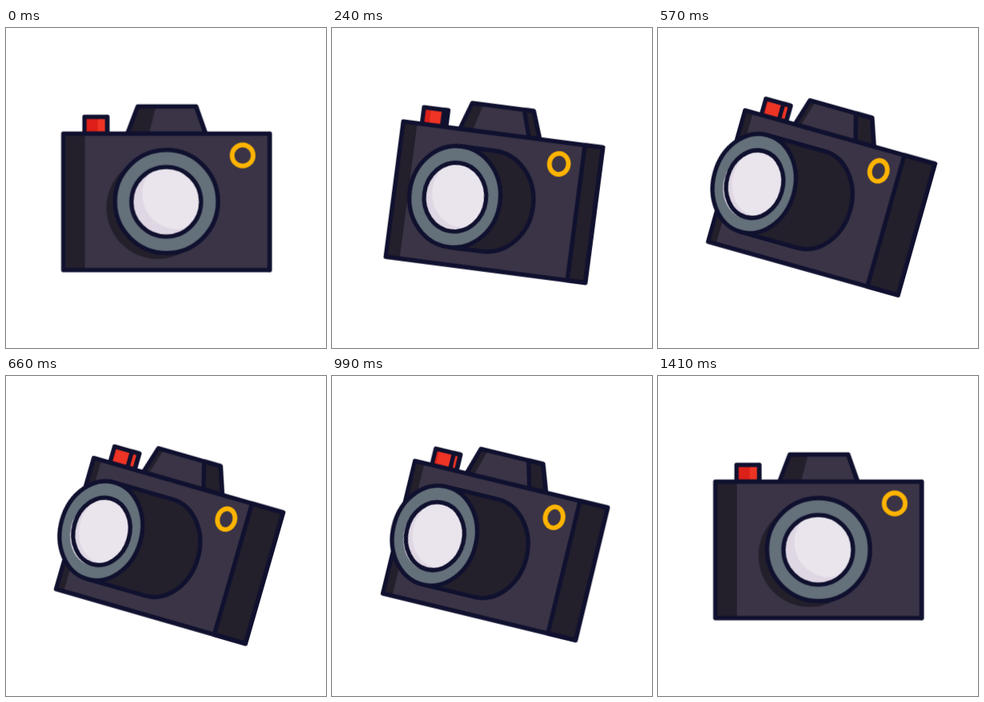
These frames come from a looping animation (400x400 px, 3.47 s). An HTML page without scripts:

```html
<!DOCTYPE html>
<html lang="en">
<head>
<meta charset="utf-8">
<title>Turning camera</title>
<style>
  html, body { margin: 0; width: 100%; height: 100%; overflow: hidden; background: #fff; }
  svg { display: block; width: 100%; height: 100%; }

  .camera {
    transform-origin: 200px 217px;
    animation: turn 3470ms infinite;
  }
  /* Each path morphs from --a (front view) to --b (turned view) and back. */
  path {
    d: var(--a);
    animation: morph 3470ms infinite;
    stroke-width: 5.3;
    stroke-linejoin: round;
    stroke-linecap: round;
  }
  .line { stroke: #10112f; }
  .none { fill: none; }
  .body { fill: #3a3446; }
  .dark { fill: #231f2b; }
  .red { fill: #ee3424; }
  .deep { fill: #dd2019; }
  .ring { fill: #64707a; }
  .glass { fill: #eae5ed; }
  .shade { fill: #dfd7e3; }
  .badge { fill: none; stroke: #ffb400; stroke-width: 5.8; }

  @keyframes turn {
    0% { transform: rotate(0deg); animation-timing-function: cubic-bezier(.4, 0, .22, 1); }
    20.317% { transform: rotate(16.1deg); animation-timing-function: cubic-bezier(.75, 0, .54, 1); }
    40.634%, 100% { transform: rotate(0deg); }
  }
  @keyframes morph {
    0% { d: var(--a); animation-timing-function: cubic-bezier(.355, 0, .16, 1); }
    20.317% { d: var(--b); animation-timing-function: cubic-bezier(.8, 0, .62, 1); }
    40.634%, 100% { d: var(--a); }
  }
</style>
</head>
<body>
<svg viewBox="-.6 -.6 400 400">
  <g class="camera">
    <!-- viewfinder -->
    <path class="body" style="--a:path('M164 97.5L237 97.5L249 131.5L151 131.5Z');--b:path('M155 97.5L236 97.5L248 131.5L145 131.5Z')"/>
    <path class="dark" style="--a:path('M164 97.5L187 97.5L178 131.5L151 131.5Z');--b:path('M155 97.5L162 97.5L152 131.5L145 131.5Z')"/>
    <path class="dark line" style="--a:path('M237 97.5L237 97.5L249 131.5L249 131.5Z');--b:path('M214.5 97.5L236 97.5L248 131.5L223.5 131.5Z')"/>
    <path class="none line" style="--a:path('M164 97.5L237 97.5L249 131.5L151 131.5Z');--b:path('M155 97.5L236 97.5L248 131.5L145 131.5Z')"/>

    <!-- shutter button -->
    <path class="red" style="--a:path('M97.5 110.5H126V131.5H97.5Z');--b:path('M101.8 110.5H134V131.5H101.8Z')"/>
    <path class="deep" style="--a:path('M97.5 110.5H114V131.5H97.5Z');--b:path('M101.8 110.5H105V131.5H101.8Z')"/>
    <path class="red line" style="--a:path('M126 110.5H126V131.5H126Z');--b:path('M124.5 110.5H134V131.5H124.5Z')"/>
    <path class="none line" style="--a:path('M97.5 110.5H126V131.5H97.5Z');--b:path('M101.8 110.5H134V131.5H101.8Z')"/>

    <!-- body -->
    <path class="body" style="--a:path('M71 131.5H329V302H71Z');--b:path('M80.8 131.5H327.3V302H80.8Z')"/>
    <path class="dark" style="--a:path('M71 131.5H98V302H71Z');--b:path('M80.8 131.5H90.8V302H80.8Z')"/>
    <path class="dark line" style="--a:path('M329 131.5H329V302H329Z');--b:path('M286.5 131.5H327.3V302H286.5Z')"/>
    <path class="none line" style="--a:path('M71 131.5H329V302H71Z');--b:path('M80.8 131.5H327.3V302H80.8Z')"/>
    <path class="badge" style="--a:path('M282 158.7a13.2 13.2 0 1 1 26.4 0a13.2 13.2 0 1 1 -26.4 0Z');--b:path('M250.2 159.2a10.8 13.2 0 1 1 21.6 0a10.8 13.2 0 1 1 -21.6 0Z')"/>

    <!-- lens -->
    <path class="dark" style="--a:path('M125 224a64 64 0 1 1 128 0a64 64 0 1 1 -128 0Z');--b:path('M100 219a50 60 0 1 1 100 0a50 60 0 1 1 -100 0Z')"/>
    <path class="dark line" style="--a:path('M200 152H200A64.3 64.3 0 0 1 200 280.6H200Z');--b:path('M114.6 153.8H190A50.5 62.7 0 0 1 190 279.2H114.6Z')"/>
    <path class="ring line" style="--a:path('M135.7 216.3a64.3 64.3 0 1 1 128.6 0a64.3 64.3 0 1 1 -128.6 0Z');--b:path('M63.8 216.5a50.8 62.7 0 1 1 101.6 0a50.8 62.7 0 1 1 -101.6 0Z')"/>
    <path class="glass" style="--a:path('M156.2 216.7a43.5 43.5 0 1 1 87 0a43.5 43.5 0 1 1 -87 0Z');--b:path('M80.5 217a35 42.7 0 1 1 70 0a35 42.7 0 1 1 -70 0Z')"/>
    <path class="shade" style="--a:path('M182 177A43.5 43.5 0 1 0 231 247A43.5 43.5 0 0 1 182 177Z');--b:path('M100 179.3A35 42.7 0 1 0 134 252.7A35 42.7 0 0 1 100 179.3Z')"/>
    <path class="none line" style="--a:path('M156.2 216.7a43.5 43.5 0 1 1 87 0a43.5 43.5 0 1 1 -87 0Z');--b:path('M80.5 217a35 42.7 0 1 1 70 0a35 42.7 0 1 1 -70 0Z')"/>
  </g>
</svg>
</body>
</html>
```
